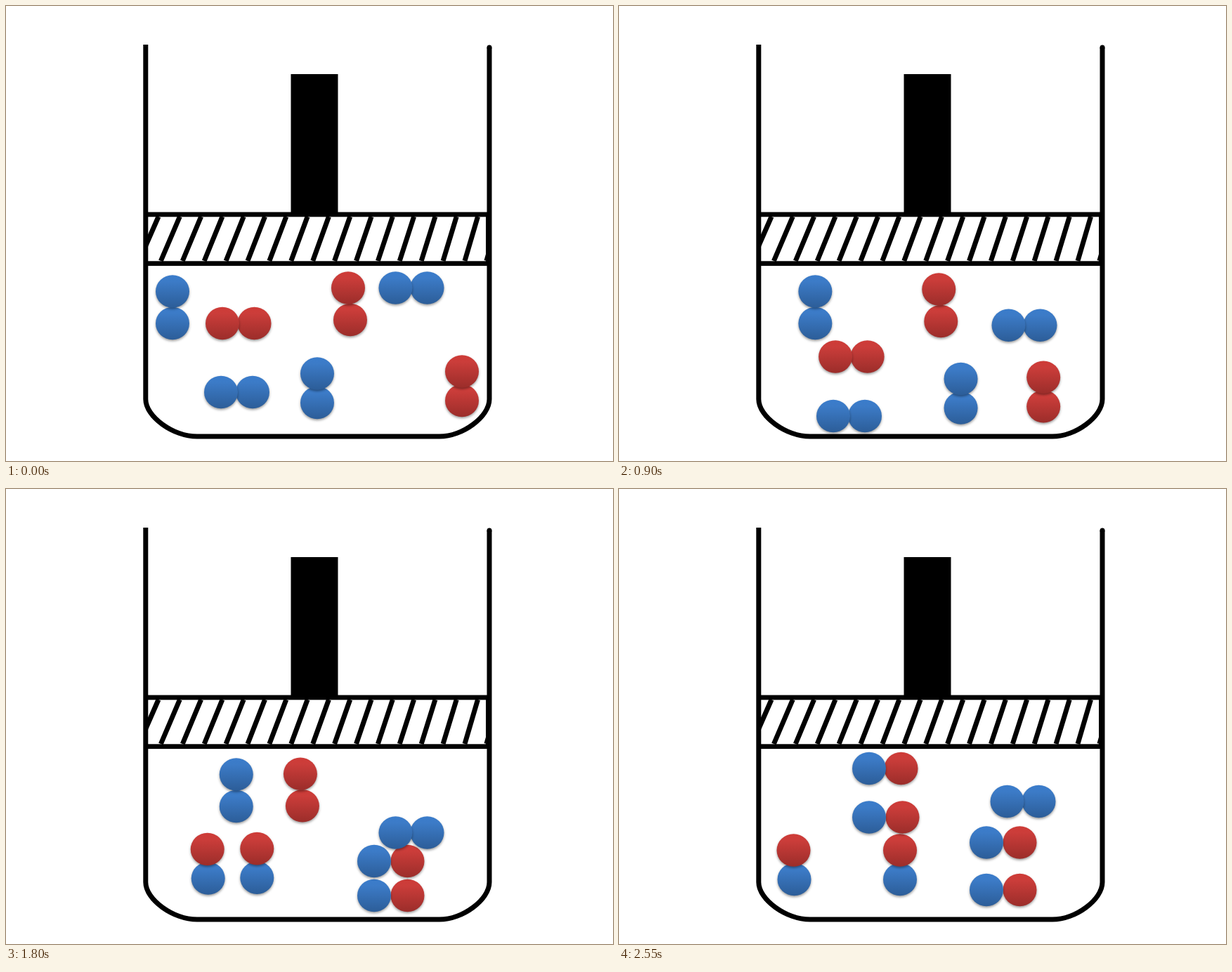
An HTML page with a canvas that plays this animation: 864 by 648 pixels, repeating every 2700 ms.

```html
<!DOCTYPE html>
<html lang="en">
<head>
<meta charset="utf-8">
<title>Gas reaction under a piston</title>
<style>
  html, body { margin: 0; width: 100%; height: 100%; overflow: hidden; background: #fff; }
  canvas { display: block; }
</style>
</head>
<body>
<canvas id="stage" width="864" height="648"></canvas>
<script>
const ctx = document.getElementById('stage').getContext('2d');
const STEP = 150, STEPS = 18;
const RX = 24, RY = 23.3;
const BOND = 45.5, CLOSE = 41.5, WIDE = 47.5;
const COLORS = {
  b: ['#3a7ccb', '#3c7bc7', '#2c5d98'],
  r: ['#ce3b37', '#cb3d3a', '#9b2d2a']
};
const molecules = [];

// atoms: colours of the two atoms; offset: second atom relative to the first;
// ease: exponent applied to progress (below 1 slows down, above 1 speeds up);
// path: [step, x, y] points of the first atom, which also bound its lifetime
const add = (atoms, offset, ease, ...path) => molecules.push({ atoms, offset, ease, path });

// reactants
add('rr', [3, BOND], 1.1, [0, 487, 401.5], [15, 400, 407]);
add('bb', [0, BOND], 1.1, [0, 237, 406.5], [15, 353, 406.5]);
add('bb', [45, 0], 0.5, [0, 306, 550], [3, 306, 584], [6, 305, 584], [9, 302.5, 559.5]);
add('rr', [BOND, 0], 0.6, [0, 308, 452], [4, 311, 485], [9, 306, 510]);
add('rr', [0, CLOSE], 1.1, [0, 649, 520.5], [9, 579, 533.5], [11, 572, 533.5]);
add('bb', [0, CLOSE], 1, [0, 443, 523.5], [4, 472, 530], [11, 523, 533.5]);

// products
add('rb', [1, CLOSE], 1, [10, 302, 512.5], [17, 248.5, 514.5]);
add('rb', [0, CLOSE], 1.25, [10, 346, 511.5], [17, 400, 514.5]);
add('br', [WIDE, 0], 1, [12, 524, 579], [14, 523, 585], [17, 523, 571]);
add('br', [WIDE, 0], 0.6, [12, 524, 530], [17, 523, 503.5]);
add('br', [BOND, 0], 1, [16, 356, 403], [17, 356, 398]);
add('br', [WIDE, 0], 1, [16, 356, 459], [17, 356, 467.5]);

// unreacted
add('bb', [45, 0], 0.82, [0, 554.5, 401.5], [11, 554.5, 489], [12, 554.5, 489.5], [17, 552.5, 445]);

function place({ path, ease }, step) {
  const i = path.findIndex((_, n) => n > 0 && step <= path[n][0]);
  if (i < 0 || step < path[0][0]) return null;
  const [t0, x0, y0] = path[i - 1], [t1, x1, y1] = path[i];
  const p = ((step - t0) / (t1 - t0)) ** ease;
  return [x0 + (x1 - x0) * p, y0 + (y1 - y0) * p];
}

function drawAtom(color, x, y) {
  const fill = ctx.createLinearGradient(0, y - RY, 0, y + RY);
  [0, 0.2, 1].forEach((stop, i) => fill.addColorStop(stop, COLORS[color][i]));
  ctx.save();
  ctx.shadowColor = 'rgba(0,0,0,.38)';
  ctx.shadowBlur = 3.5;
  ctx.shadowOffsetY = 2;
  ctx.fillStyle = fill;
  ctx.beginPath();
  ctx.ellipse(x, y, RX, RY, 0, 0, Math.PI * 2);
  ctx.fill();
  ctx.restore();
}

function drawVessel() {
  ctx.strokeStyle = ctx.fillStyle = '#000';
  ctx.lineWidth = 7;
  ctx.beginPath();
  ctx.moveTo(198.8, 55);
  ctx.lineTo(198.8, 560);
  ctx.bezierCurveTo(198.8, 585, 238, 613, 272, 613);
  ctx.lineTo(617, 613);
  ctx.bezierCurveTo(650, 613, 688, 585, 688, 560);
  ctx.lineTo(688, 59);
  ctx.stroke();
  ctx.beginPath();
  ctx.arc(688, 59, 3.5, 0, Math.PI * 2);
  ctx.fill();
}

function drawPiston() {
  ctx.fillRect(405.5, 97, 67, 200);
  ctx.fillRect(200, 293.5, 487, 6.8);
  ctx.fillRect(200, 363.3, 487, 6.8);
  ctx.fillRect(683, 295, 5, 73);

  ctx.save();
  ctx.beginPath();
  ctx.rect(202, 298, 484, 68);
  ctx.clip();
  ctx.beginPath();
  for (let i = 0; i < 17; i++) {
    ctx.moveTo(217 + 30.3 * i, 300);
    ctx.lineTo(189.5 + 30.9 * i, 363);
  }
  ctx.stroke();
  ctx.restore();
}

function draw(now) {
  const step = Math.floor(now / STEP) % STEPS;
  ctx.fillStyle = '#fff';
  ctx.fillRect(0, 0, 864, 648);
  drawVessel();
  drawPiston();
  for (const molecule of molecules) {
    const at = place(molecule, step);
    if (!at) continue;
    const [x, y] = at, [dx, dy] = molecule.offset;
    drawAtom(molecule.atoms[1], x + dx, y + dy);
    drawAtom(molecule.atoms[0], x, y);
  }
}

let start;
function tick(now) {
  start ??= now;
  draw(now - start);
  requestAnimationFrame(tick);
}
draw(0);
requestAnimationFrame(tick);
</script>
</body>
</html>
```
